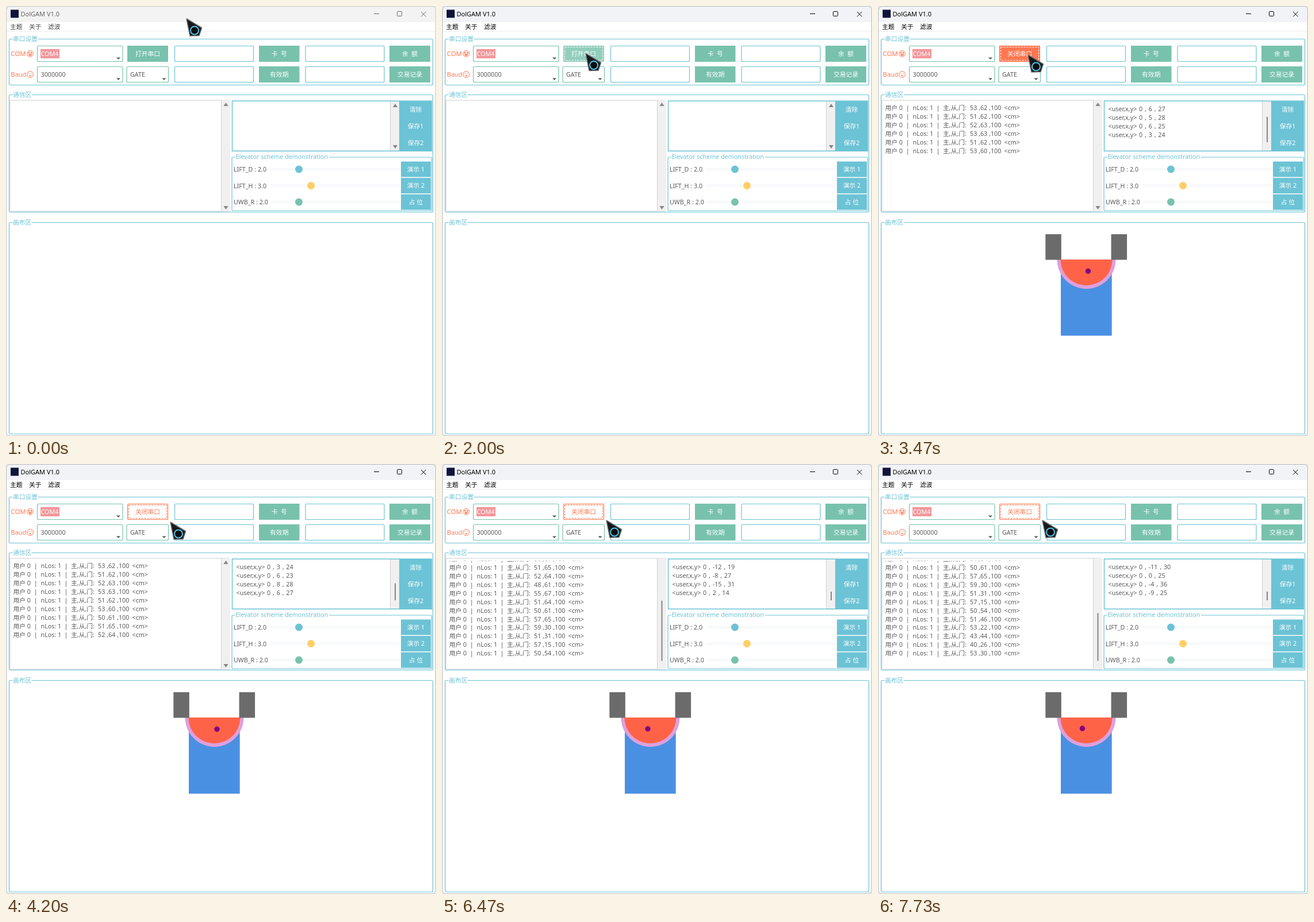
These frames come from a looping animation (748 px wide and 748 px high, 8000 ms). An HTML page with a canvas:

```html
<!DOCTYPE html>
<html lang="zh-CN">
<head>
<meta charset="utf-8">
<title>DolGAM V1.0</title>
<style>
html, body { margin: 0; width: 100%; height: 100%; overflow: hidden; background: #fff; }
canvas { display: block; width: 748px; height: 748px; }
</style>
</head>
<body>
<canvas id="stage" width="748" height="748"></canvas>
<script>
const ctx = document.getElementById('stage').getContext('2d');
const LOOP = 8000;
const FONT = '"Noto Sans", "Noto Sans CJK SC", "Noto Sans CJK", sans-serif';
const GREEN = '#78c2ad', PINK = '#f3969a', BLUE = '#6cc3d5', YELLOW = '#ffce67',
      ORANGE = '#ff7851', TEXT = '#5a5a5a';

// Arrival time of each reading, and its two measured distances
const ticks = [2260, 2465, 2725, 2995, 3195, 3465, 3725, 3995, 4195, 4465, 4725, 4995,
  5195, 5465, 5725, 5995, 6195, 6465, 6725, 6995, 7195, 7465, 7725];
const readings = ('53,62 51,62 52,63 53,63 51,62 53,60 50,61 51,65 52,64 48,61 55,67 51,64 ' +
  '50,61 57,65 59,30 51,31 57,15 50,54 51,46 53,22 43,44 40,26 53,30')
  .split(' ').map(s => s.split(',').map(Number));
const HALF = 50;

function locate([a, b]) {
  const x = Math.trunc((b * b - a * a) / (4 * HALF));
  const y = Math.trunc(Math.sqrt(Math.abs(a * a - (HALF - x) ** 2)));
  return [x, y];
}

// Filtered marker position after each reading, from the sixth on
const markerX = [365.5, 366, 367, 367, 367, 367, 367, 367, 366, 363.5, 361.5, 359.5, 358,
  357.5, 356.5, 356, 356, 355.5];

const path = [[0, 314, 22], [70, 314, 22], [600, 226, 68], [870, 249, 81], [1000, 249, 81],
  [1070, 250, 82.5], [2670, 250, 82.5], [2730, 256.5, 83], [3000, 261, 85], [3650, 261, 85],
  [3800, 286, 103], [4140, 286, 103], [4200, 286, 101], [4990, 286, 101], [5190, 286, 98]];

const clamp = v => Math.max(0, Math.min(1, v));

function pointer(t) {
  let i = path.findIndex(p => p[0] > t);
  if (i < 0) return path[path.length - 1].slice(1);
  const a = path[i - 1], b = path[i];
  const u = clamp((t - a[0]) / (b[0] - a[0]));
  const k = u * u * (3 - 2 * u);
  return [a[1] + (b[1] - a[1]) * k, a[2] + (b[2] - a[2]) * k];
}

function text(s, x, y, color = TEXT, align = 'left', size = 10.75) {
  ctx.font = `${size}px ${FONT}`;
  ctx.textAlign = align;
  ctx.fillStyle = color;
  ctx.fillText(s, x, y + size * 0.36);
}

function fill(x, y, w, h, color) {
  ctx.fillStyle = color;
  ctx.fillRect(x, y, w, h);
}

function outline(x, y, w, h, color, width = 1.2, r = 2) {
  ctx.strokeStyle = color;
  ctx.lineWidth = width;
  ctx.beginPath();
  ctx.roundRect(x, y, w, h, r);
  ctx.stroke();
}

function shape(points, color) {
  ctx.fillStyle = color;
  ctx.beginPath();
  points.forEach(p => ctx.lineTo(...p));
  ctx.closePath();
  ctx.fill();
}

function disc(x, y, r, color, end = Math.PI * 2) {
  ctx.fillStyle = color;
  ctx.beginPath();
  ctx.arc(x, y, r, 0, end);
  ctx.fill();
}

function line(color, width, ...points) {
  ctx.strokeStyle = color;
  ctx.lineWidth = width;
  ctx.beginPath();
  points.forEach(p => ctx.lineTo(...p));
  ctx.stroke();
}

function group(label, x, y, w, h, gap) {
  outline(x, y, w, h, BLUE);
  fill(x + 6, y - 2, gap, 4, '#fff');
  text(label, x + 6.5, y - 0.5, BLUE);
}

function button(label, x, y, w, h, color) {
  fill(x, y, w, h, color);
  text(label, x + w / 2, y + h / 2, '#fff', 'center');
}

function combo(label, x, y, w, selected) {
  outline(x, y, w, 27, GREEN);
  if (selected) fill(60, 75, 33, 16, PINK);
  text(label, x + 6, y + 13.5, selected ? '#fff' : TEXT);
  const ax = x + w - 7.5, ay = y + 20;
  shape([[ax - 3.5, ay], [ax + 3.5, ay], [ax, ay + 3.5]], TEXT);
}

function face(x, y, grin) {
  ctx.strokeStyle = ORANGE;
  ctx.lineWidth = 1;
  ctx.beginPath();
  ctx.arc(x, y, 5.4, 0, Math.PI * 2);
  ctx.stroke();
  disc(x - 2.1, y - 1.5, grin ? 1.4 : 0.8, ORANGE);
  disc(x + 2.1, y - 1.5, grin ? 1.4 : 0.8, ORANGE);
  if (grin) disc(x, y + 0.8, 3, ORANGE, Math.PI);
  else disc(x, y + 2.3, 1.2, ORANGE);
}

// Arrows fade into a thin thumb once the content overflows
function scrollbar(x, top, bottom, thumbEnd, thumb, k) {
  ctx.globalAlpha = 1 - k;
  shape([[x - 4, top + 6], [x + 4, top + 6], [x, top]], '#858585');
  shape([[x - 4, bottom - 6], [x + 4, bottom - 6], [x, bottom]], '#858585');
  ctx.globalAlpha = k;
  fill(x - 1, thumbEnd - thumb, 2, thumb, '#858585');
  ctx.globalAlpha = 1;
}

function windowFrame(active) {
  const ink = active ? '#000' : '#666';
  fill(0, 0, 748, 748, '#e4e4e4');
  ctx.fillStyle = '#fff';
  ctx.beginPath();
  ctx.roundRect(0, 0, 748, 748, 7);
  ctx.fill();
  ctx.fillStyle = active ? '#f1f3f6' : '#f3f3f3';
  ctx.beginPath();
  ctx.roundRect(0, 0, 748, 28, [7, 7, 0, 0]);
  ctx.fill();
  fill(1, 43.5, 746, 1, '#ececec');
  outline(0.5, 0.5, 747, 747, active ? '#b4b6b9' : '#c4c4c4', 1, 7);
  fill(8, 6.5, 14, 14, '#10143a');
  text('DolGAM V1.0', 25.5, 14, ink, 'left', 11);
  const menuInk = active ? '#000' : '#444';
  ['主题', '关于', '滤波'].forEach((s, i) => text(s, 7 + 33 * i, 36, menuInk));
  line(ink, 1, [640, 13.5], [649, 13.5]);
  outline(680.5, 9.5, 8, 8, ink, 1, 1);
  line(ink, 1, [722, 10], [730.5, 18.5]);
  line(ink, 1, [730.5, 10], [722, 18.5]);
}

function portButton(t) {
  const x = 211, y = 69, w = 71, h = 28;
  const open = t >= 2120, hover = t < 3740;
  const label = open ? '关闭串口' : '打开串口';
  if (t < 1990) return button(label, x, y, w, h, GREEN);
  let dash = '#fff';
  if (!open) button(label, x, y, w, h, '#93cebd');
  else if (hover) button(label, x, y, w, h, ORANGE);
  else {
    outline(x + 0.5, y + 0.5, w - 1, h - 1, ORANGE, 1.2);
    text(label, x + w / 2, y + h / 2, ORANGE, 'center');
    dash = ORANGE;
  }
  ctx.setLineDash([3, 2]);
  outline(x + 2.5, y + 2.5, w - 5, h - 5, dash, 1, 0);
  ctx.setLineDash([]);
}

function settings(t) {
  group('串口设置', 5.5, 57.5, 737, 80, 44);
  text('COM', 8.5, 83, ORANGE, 'left', 11.3);
  text('Baud', 8.5, 119, ORANGE, 'left', 11);
  face(42, 83, true);
  face(42, 119, false);
  combo('COM4', 54.5, 69.5, 148.5, true);
  combo('3000000', 54.5, 105.5, 148.5);
  combo('GATE', 210, 105.5, 72.5);
  portButton(t);
  for (const x of [293.5, 521]) for (const y of [69.5, 105.5]) outline(x, y, 137, 27, BLUE);
  button('卡  号', 440, 69, 70.5, 28, GREEN);
  button('有效期', 440, 105, 70.5, 28, GREEN);
  button('余  额', 667, 69, 71, 28, GREEN);
  button('交易记录', 667, 105, 71, 28, GREEN);
}

function logLine([a, b], y) {
  text('用户 0', 12.5, y);
  text('|', 51.7, y, TEXT, 'center');
  text('nLos: 1', 60.5, y);
  text('|', 104.5, y, TEXT, 'center');
  text('主,从,门:', 113, y);
  text(`${a} ,${b} ,100`, 160, y);
  text('<cm>', 219.5, y);
}

function logs(t, n) {
  const step = 14.94;
  group('通信区', 5.5, 154.5, 737, 204, 33);

  outline(7, 164, 382, 193, '#d0d0d0', 1, 0);
  fill(374.5, 164, 15.5, 193, '#f0f0f0');
  line('#d0d0d0', 1, [374.5, 164], [374.5, 357]);
  ctx.save();
  ctx.beginPath();
  ctx.rect(8, 168.5, 366, 186);
  ctx.clip();
  const top = n > 11 ? 329.4 - (n - 1) * step : 177.5;
  for (let i = Math.max(0, n - 12); i < n; i++) logLine(readings[i], top + i * step);
  ctx.restore();
  scrollbar(382.5, 168, 354, 342.5, 2012 / (n + 1.2), clamp((t - ticks[11]) / 130));

  fill(668.5, 166, 15.5, 86, '#f0f0f0');
  line('#d0d0d0', 1, [668.5, 166], [668.5, 252]);
  ctx.wordSpacing = '1px';
  const first = Math.max(0, n - 4);
  for (let i = first; i < n; i++) {
    const [x, y] = locate(readings[i]);
    text(`<user,x,y> 0 , ${x} , ${y}`, 400.5, 179.5 + (i - first) * step);
  }
  ctx.wordSpacing = '0px';
  scrollbar(677, 170, 248, 237, Math.max(15, 265 / Math.max(1, n)), clamp((t - ticks[4]) / 130));
  outline(393.5, 165.3, 347, 87, BLUE, 1.5, 0);
  fill(684, 165, 57, 88, BLUE);
  ['清除', '保存1', '保存2'].forEach((s, i) => text(s, 712.5, 180.5 + 28.7 * i, '#fff', 'center'));
}

function sliders() {
  group('Elevator scheme demonstration', 393, 263, 347.5, 93, 163);
  const rows = [['LIFT_D : 2.0', 509.5, BLUE, '演示 1'], ['LIFT_H : 3.0', 530.5, YELLOW, '演示 2'],
    ['UWB_R : 2.0', 509.5, GREEN, '占 位']];
  rows.forEach(([label, x, color, action], i) => {
    const y = 284 + 28.5 * i;
    text(label, 396, y + 0.5);
    fill(461, y - 2.5, 225, 5, '#f8f9fa');
    disc(x, y, 6.5, color);
    button(action, 687, y - 13.5, 52, 27, BLUE);
  });
}

function plot(t, n) {
  group('画布区', 5.5, 376.5, 737, 368, 33);
  if (t < 2190) return;
  const cx = 362.5, cy = 441;
  fill(318, cy, 88.7, 132.5, '#4a90e2');
  disc(cx, cy, 51, '#dda0dd', Math.PI);
  disc(cx, cy, 45, '#ff6347', Math.PI);
  fill(291.3, 397, 27.5, 44.5, '#6b6b6b');
  fill(405.6, 397, 27.5, 44.5, '#6b6b6b');
  if (!n) return;
  const x = n < 6 ? 366.5 : markerX[n - 6];
  disc(x, n < 14 ? 461.3 : n < 20 ? 460.7 : 460, 4.7, '#800080');
}

function cursor(x, y) {
  const body = [[0, 0], [26.5, 16], [22, 29.5], [6, 30]].map(([a, b]) => [x + a, y + b]);
  ctx.lineJoin = 'round';
  shape(body, '#17191c');
  line('#6a6a6a', 1.5, ...body, body[0]);
  ctx.lineJoin = 'miter';
  disc(x + 14, y + 20.5, 8, '#0a0d10');
  ctx.strokeStyle = '#52c4e6';
  ctx.lineWidth = 2;
  ctx.beginPath();
  ctx.arc(x + 14, y + 20.5, 7, 0, Math.PI * 2);
  ctx.stroke();
}

function draw(t) {
  const n = ticks.filter(k => k <= t).length;
  windowFrame(t >= 1990);
  settings(t);
  logs(t, n);
  sliders();
  plot(t, n);
  cursor(...pointer(t));
}

const start = performance.now();
function frame() {
  draw((performance.now() - start) % LOOP);
  requestAnimationFrame(frame);
}
frame();
</script>
</body>
</html>
```
